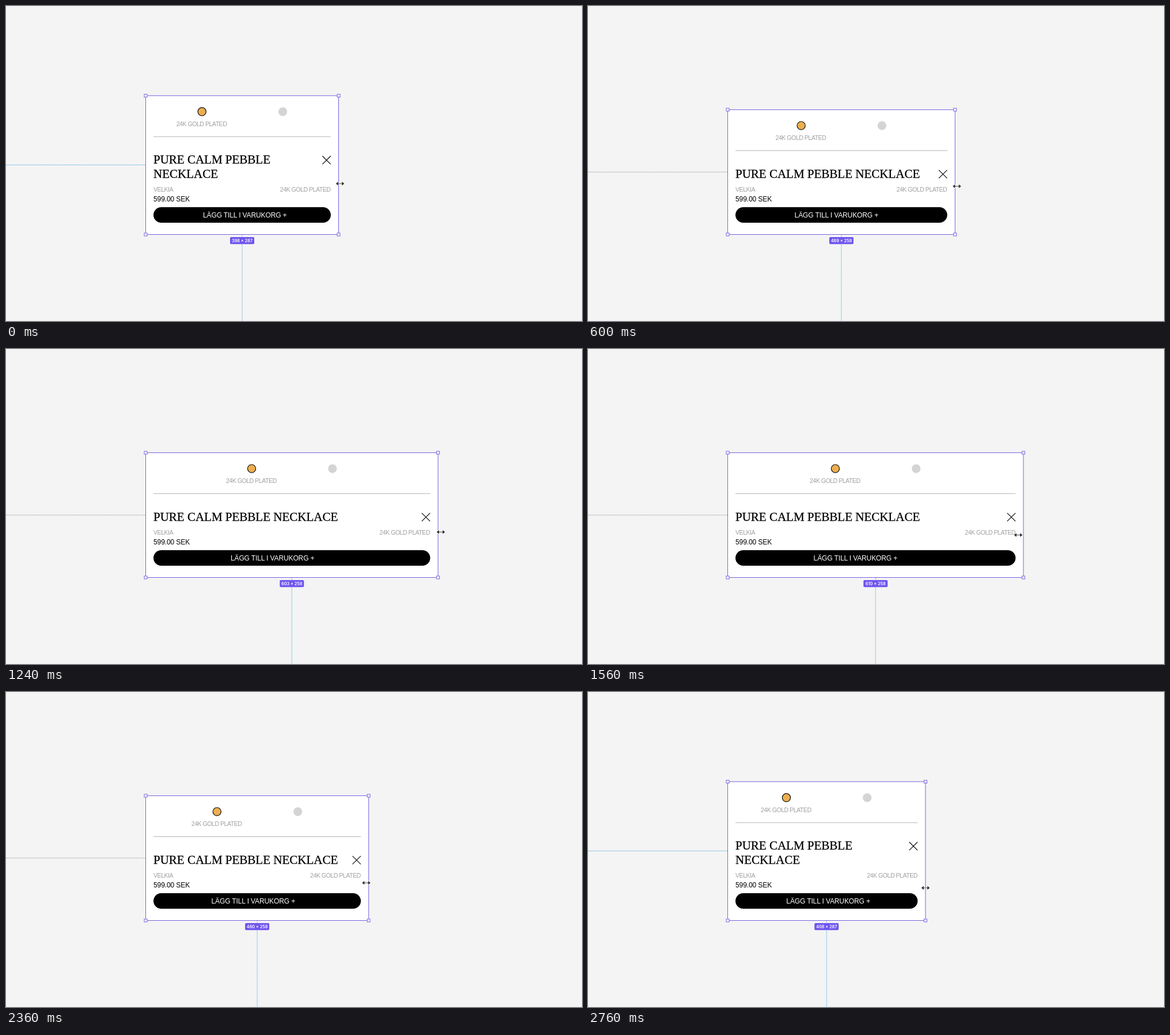
Animation of 1000x548 px, one loop 2.8 s. Source, as an HTML page:

```html
<!DOCTYPE html>
<html lang="sv">
<head>
<meta charset="utf-8">
<title>Resizing a product card</title>
<style>
html, body { margin: 0; width: 100%; height: 100%; overflow: hidden; background: #f4f4f4; }
svg { display: block; width: 100vw; height: 100vh; }
text { font-family: "Liberation Sans", Arial, sans-serif; font-size: 12px; white-space: pre; }
.title { font: 21px "Liberation Serif", "Times New Roman", serif; stroke: #000; stroke-width: .3px; }
.soft { font-size: 10.6px; letter-spacing: -.5px; fill: #a0a0a0; }
.price { letter-spacing: -.1px; }
.cta { fill: #fff; letter-spacing: -.12px; }
.size { font: 600 7.3px Inter, sans-serif; fill: #fff; text-anchor: middle; }
.guide { fill: none; stroke: #58acdf; stroke-dasharray: 1.5 1; }
.handle { fill: #fff; stroke: #7b61e0; }
</style>
</head>
<body>
<svg viewBox="0 0 1000 548" preserveAspectRatio="none">
  <rect width="1000" height="548" fill="#f4f4f4"/>
  <path id="guideX" class="guide"/>
  <path id="guideY" class="guide"/>
  <rect id="card" x="242.5" fill="#fff" stroke="#7b61e0"/>

  <g id="top">
    <g id="swatches">
      <circle cx="-69.8" cy="183.8" r="7.1" fill="#ecae50" stroke="#111" stroke-width="1.2"/>
      <circle cx="70.5" cy="183.8" r="7.6" fill="#d4d4d4"/>
      <text class="soft" x="-70.5" y="209.2" text-anchor="middle">24K GOLD PLATED</text>
    </g>
    <path id="rule" stroke="#b4b4b4"/>
    <path id="close" d="M-7.2 261l14.4 14.4m0-14.4l-14.4 14.4" stroke="#000" stroke-width="1.1"/>
  </g>

  <text id="name" class="title" x="256"></text>
  <text id="name2" class="title" x="256" y="298.5">NECKLACE</text>
  <text class="soft" x="256" y="322.8">VELKIA</text>
  <text id="finish" class="soft" y="322.8" text-anchor="end">24K GOLD PLATED</text>
  <text class="price" x="256" y="340.2">599.00 SEK</text>
  <rect id="button" x="256" y="350" height="27" rx="13.5"/>
  <text id="cta" class="cta" y="367.9">LÄGG TILL I VARUKORG +</text>

  <g id="handles"></g>
  <g id="badge">
    <rect x="-21" y="402" width="42" height="12.3" rx="2" fill="#7055ee"/>
    <text id="size" class="size" y="410.9"></text>
  </g>
  <g id="cursor" stroke-linejoin="round">
    <path d="M-4 0H4M-6.8 0l3.2-2.6v5.2zM6.8 0l-3.2-2.6v5.2z" fill="#fff" stroke="#fff" stroke-width="2.2"/>
    <path d="M-4 0H4M-6.8 0l3.2-2.6v5.2zM6.8 0l-3.2-2.6v5.2z" fill="#333" stroke="#333" stroke-width=".9"/>
  </g>
</svg>
<script>
const LOOP = 2800, STEP = 40, SCALE = 0.8417;
const LEFT = 242.5, BOTTOM = 397.5, WRAP = 446;

// time, card width in design units, pointer x, pointer y
const keys = [
  [0, 398, 580, 309],
  [160, 398, 580, 309],
  [600, 469, 640.5, 313.6],
  [720, 486, 655.5, 314],
  [1000, 541, 706, 315],
  [1280, 613, 763, 319],
  [1360, 618, 764, 320.5],
  [1480, 617, 758.5, 322.5],
  [1560, 610, 747, 323.6],
  [1680, 557, 708, 324.3],
  [1840, 557, 708, 324.3],
  [1960, 533, 687, 325],
  [2360, 460, 625.5, 332],
  [2400, 453, 619.5, 333],
  [2760, 408, 586, 340.8]
];

const $ = id => document.getElementById(id);
const set = (id, attrs) => {
  for (const k in attrs) $(id).setAttribute(k, attrs[k]);
};
const move = (id, x, y = 0) => set(id, { transform: `translate(${x} ${y})` });

const corners = Array.from({ length: 4 }, () => {
  const r = document.createElementNS("http://www.w3.org/2000/svg", "rect");
  r.setAttribute("class", "handle");
  r.setAttribute("width", 5);
  r.setAttribute("height", 5);
  return $("handles").appendChild(r);
});

function pose(t) {
  const i = keys.findIndex(k => k[0] >= t);
  if (i < 1) return keys[0];
  const a = keys[i - 1], b = keys[i];
  const p = (t - a[0]) / (b[0] - a[0]);
  return a.map((v, n) => v + (b[n] - v) * p);
}

function draw(t) {
  const [, width, px, py] = pose(t);
  const w = Math.round(width);
  const tall = w < WRAP, h = tall ? 287 : 258;
  const right = LEFT + w * SCALE, top = tall ? 156 : 180.4;
  const mid = (LEFT + right) / 2, end = right - 13.6;
  const level = tall ? 276.5 : 288.9;

  set("card", { y: top, width: right - LEFT, height: BOTTOM - top });
  corners.forEach((c, n) => {
    c.setAttribute("x", (n % 2 ? right : LEFT) - 2.5);
    c.setAttribute("y", (n < 2 ? top : BOTTOM) - 2.5);
  });

  set("guideX", { d: `M0 ${level}H${LEFT}` });
  $("guideX").style.stroke = tall ? "#58acdf" : "#969ba0";
  set("guideY", { d: `M${mid} ${BOTTOM}V548` });

  move("top", 0, tall ? 0 : 24.3);
  move("swatches", mid);
  set("rule", { d: `M256 227.3H${end}` });
  move("close", right - 21);

  $("name").textContent = "PURE CALM PEBBLE" + (tall ? "" : " NECKLACE");
  set("name", { y: tall ? 274.1 : 298.5 });
  set("name2", { visibility: tall ? "visible" : "hidden" });

  set("finish", { x: end - 0.4 });
  set("button", { width: end - 256 });
  set("cta", { x: 342 + (right - 577.5) * 0.278 });

  move("badge", mid);
  $("size").textContent = `${w} × ${h}`;
  move("cursor", px, py);
}

const start = performance.now();
function tick() {
  const t = (performance.now() - start) % LOOP;
  draw(Math.floor(t / STEP) * STEP);
  requestAnimationFrame(tick);
}
tick();
</script>
</body>
</html>
```
